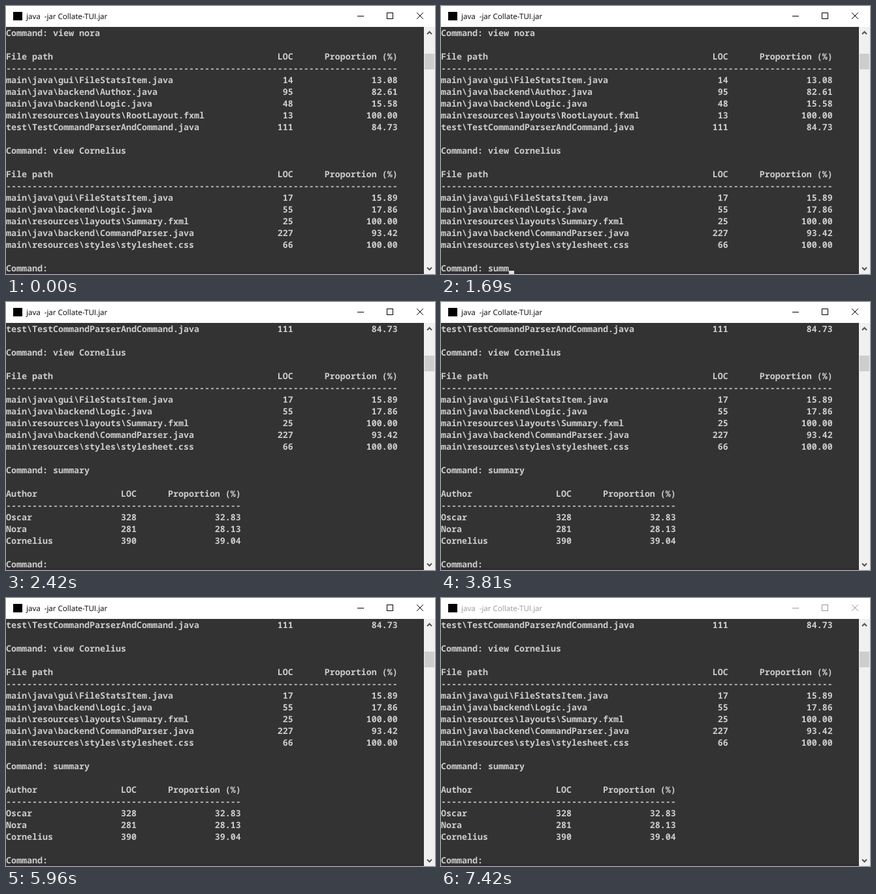
An HTML page for the animation above (7.55 s loop, 657 px wide and 410 px high).

```html
<!DOCTYPE html>
<html lang="en">
<head>
<meta charset="utf-8">
<title>Terminal</title>
<style>
  html, body { margin: 0; width: 100%; height: 100%; overflow: hidden; background: #333; }
  svg { display: block; position: absolute; left: 0; top: 0; }
  #rows text {
    font: 600 13.3333px "Noto Sans Mono", "DejaVu Sans Mono", monospace;
    fill: #ccc; white-space: pre; text-rendering: geometricPrecision;
    font-variant-ligatures: none;
  }
  #rows text.rule { fill: #cccaba; }
  #title {
    font: 11.6px "Open Sans", "Noto Sans", sans-serif;
    white-space: pre; text-rendering: geometricPrecision;
  }
  #bar { color: #000; }
  #bar.idle { color: #999; }
</style>
</head>
<body>
<svg width="657" height="410" viewBox="0 0 657 410">
  <rect width="657" height="410" fill="#333"/>
  <rect y="407" width="640" height="3" fill="#322c32"/>
  <g id="rows"></g>
  <rect id="cursor" y="405" width="8" height="5" fill="#e2e2e2"/>

  <g id="bar">
    <rect width="657" height="32" fill="#fff"/>
    <rect x="11" y="9" width="14" height="13" fill="#000"/>
    <text id="title" x="31" y="20" fill="currentColor">java  -jar Collate-TUI.jar</text>
    <g fill="none" stroke="currentColor">
      <path d="M538 15.5h10"/>
      <rect x="583.5" y="10.5" width="9" height="9"/>
      <path d="M629.2 10.2l9.6 9.6M638.8 10.2l-9.6 9.6"/>
    </g>
  </g>

  <rect x="640" y="32" width="17" height="378" fill="#f0f0f0"/>
  <rect id="thumb" x="641" y="73" width="15" height="24" fill="#cdcdcd"/>
  <path d="M645 43l3.5-3.5 3.5 3.5M645 400l3.5 3.5 3.5-3.5" fill="none" stroke="#505050" stroke-width="2"/>
</svg>
<script>
const LOOP = 7550, CELL = 8, ROW = 18, BASE = 46;
const PROMPT = 'Command: ', WORD = 'summary', INPUT_ROW = 20, SCROLL_ROWS = 8;
const SCROLL_AT = 2420, IDLE_AT = 7420;
const KEYS = [1210, 1400, 1570, 1670, 1770, 1870, 2020];
const CURSOR_ON = [[160, 680], [1570, 1770], [2230, 2420], [3290, 3810],
                   [4330, 4830], [5400, 5960], [6450, 6980]];

// Three columns: the first flush left, the others ending at the given cells.
const line = (mid, end) => ([name, loc, share]) =>
  name + loc.padStart(mid - name.length) + share.padStart(end - mid);

function table(head, mid, end, data) {
  const format = line(mid, end);
  return ['', format([head, 'LOC', 'Proportion (%)']), '-'.repeat(end), ...data.map(format), ''];
}

const lines = [
  PROMPT + 'view nora',
  ...table('File path', 55, 75, [
    ['main\\java\\gui\\FileStatsItem.java', '14', '13.08'],
    ['main\\java\\backend\\Author.java', '95', '82.61'],
    ['main\\java\\backend\\Logic.java', '48', '15.58'],
    ['main\\resources\\layouts\\RootLayout.fxml', '13', '100.00'],
    ['test\\TestCommandParserAndCommand.java', '111', '84.73']
  ]),
  PROMPT + 'view Cornelius',
  ...table('File path', 55, 75, [
    ['main\\java\\gui\\FileStatsItem.java', '17', '15.89'],
    ['main\\java\\backend\\Logic.java', '55', '17.86'],
    ['main\\resources\\layouts\\Summary.fxml', '25', '100.00'],
    ['main\\java\\backend\\CommandParser.java', '227', '93.42'],
    ['main\\resources\\styles\\stylesheet.css', '66', '100.00']
  ]),
  PROMPT,
  ...table('Author', 25, 45, [
    ['Oscar', '328', '32.83'],
    ['Nora', '281', '28.13'],
    ['Cornelius', '390', '39.04']
  ]),
  PROMPT
];

const $ = id => document.getElementById(id);
const rows = $('rows'), cursor = $('cursor'), bar = $('bar'), thumb = $('thumb');

const texts = lines.map((content, i) => {
  const t = document.createElementNS('http://www.w3.org/2000/svg', 'text');
  t.setAttribute('y', BASE + ROW * i);
  t.textContent = content;
  if (content.startsWith('--')) t.classList.add('rule');
  return rows.appendChild(t);
});

function draw(time) {
  const typed = KEYS.filter(k => k <= time).length;
  const scrolled = time >= SCROLL_AT;
  const column = PROMPT.length + (scrolled ? 0 : typed);
  const lit = CURSOR_ON.some(([on, off]) => time >= on && time < off);

  const input = PROMPT + WORD.slice(0, typed);
  if (texts[INPUT_ROW].textContent !== input) texts[INPUT_ROW].textContent = input;
  rows.setAttribute('transform', `translate(0 ${scrolled ? -SCROLL_ROWS * ROW : 0})`);
  thumb.setAttribute('y', scrolled ? 82 : 73);
  cursor.setAttribute('x', column * CELL);
  cursor.setAttribute('visibility', lit ? 'visible' : 'hidden');
  bar.classList.toggle('idle', time >= IDLE_AT);
}

const start = performance.now();
function tick() {
  draw((performance.now() - start) % LOOP);
  requestAnimationFrame(tick);
}
draw(0);
requestAnimationFrame(tick);
</script>
</body>
</html>
```
